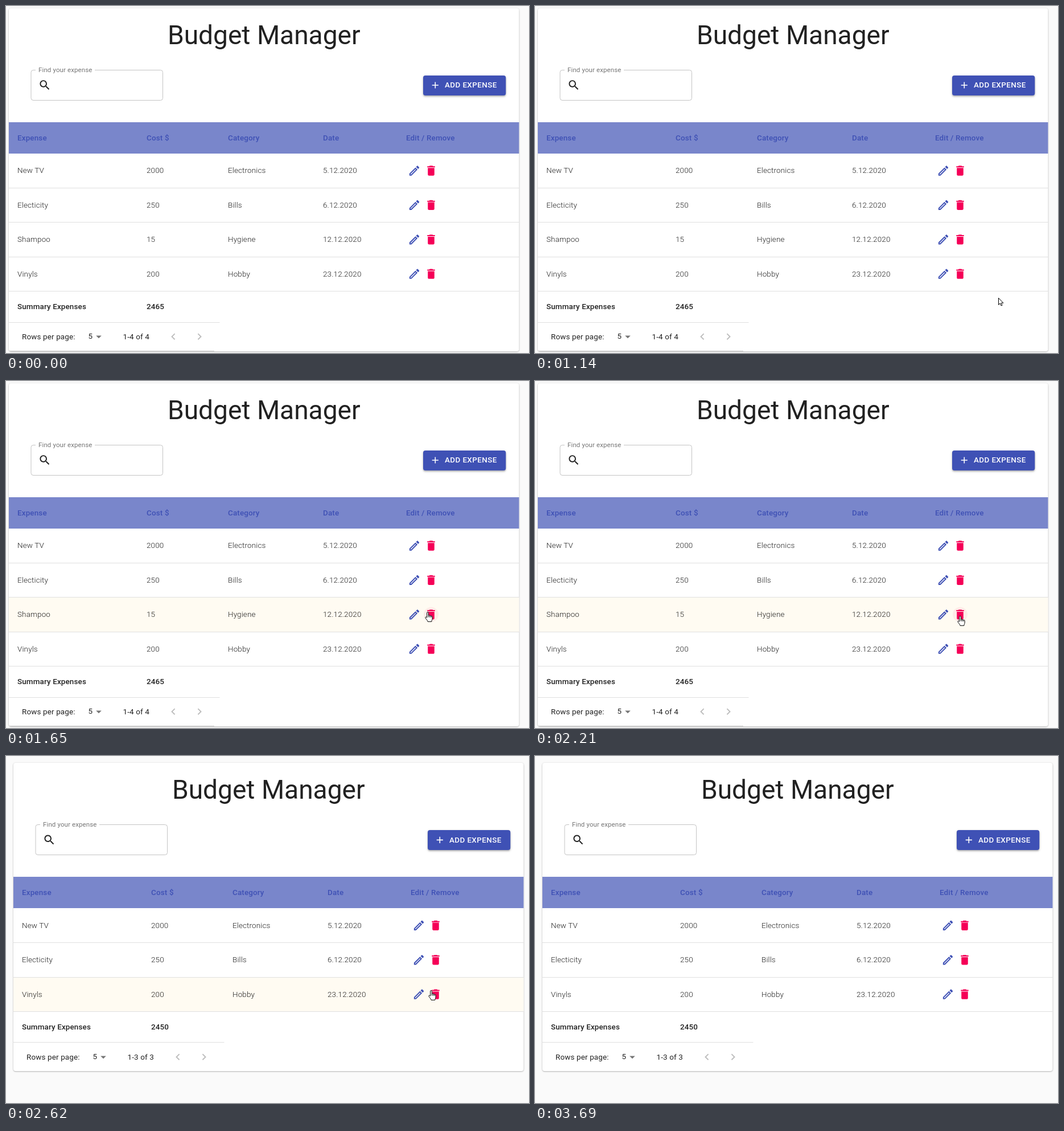
Recreate the animation shown at these times as an HTML page. Size 919x609 px, loop 4070 ms.

```html
<!DOCTYPE html>
<html lang="en">
<head>
<meta charset="utf-8">
<title>Budget Manager</title>
<style>
  html, body { margin: 0; width: 100%; height: 100%; overflow: hidden; background: #fafafa; }
  svg { display: block; }
  text { font: 400 13.44px Roboto, Arial, sans-serif; letter-spacing: .01071em; fill: rgba(0,0,0,.87); white-space: pre; }
  .title { font-size: 46.08px; letter-spacing: 0; text-anchor: middle; }
  .label { font-size: 11.52px; letter-spacing: .00938em; fill: rgba(0,0,0,.54); }
  .button { font-weight: 500; letter-spacing: .02857em; fill: #fff; }
  .head { font-weight: 500; fill: #3f51b5; }
  .cell { font-weight: 300; }
  .strong { font-weight: 500; }
  .card { filter: drop-shadow(0 1px 1px rgba(0,0,0,.24)) drop-shadow(0 0 1px rgba(0,0,0,.1)); }
  .raised { filter: drop-shadow(0 2px 1px rgba(0,0,0,.2)) drop-shadow(0 1px 2px rgba(0,0,0,.16)); }
</style>
</head>
<body>
<svg id="stage" width="919" height="609" viewBox="0 0 919 609"></svg>
<script>
const LOOP = 4070, REMOVED_AT = 2620;
const SCALE = 0.96, ROW = 60.4, BAND = 54.4, ROWS_TOP = 258.5;
const COLUMNS = [20, 247, 390, 557, 703];
const EXPENSES = [
  ['New TV', 2000, 'Electronics', '5.12.2020'],
  ['Electicity', 250, 'Bills', '6.12.2020'],
  ['Shampoo', 15, 'Hygiene', '12.12.2020'],
  ['Vinyls', 200, 'Hobby', '23.12.2020']
];
const ICONS = {
  edit: 'M14.06 9.02l.92.92L5.92 19H5v-.92l9.06-9.06M17.66 3c-.25 0-.51.1-.7.29l-1.83 1.83 3.75 3.75 1.83-1.83c.39-.39.39-1.02 0-1.41l-2.34-2.34c-.2-.2-.45-.29-.71-.29zm-3.6 3.19L3 17.25V21h3.75L17.81 9.94l-3.75-3.75z',
  trash: 'M6 19c0 1.1.9 2 2 2h8c1.1 0 2-.9 2-2V7H6v12zM19 4h-3.5l-1-1h-5l-1 1H5v2h14V4z',
  add: 'M19 13h-6v6h-2v-6H5v-2h6V5h2v6h6v2z',
  search: 'M15.5 14h-.79l-.28-.27C15.41 12.59 16 11.11 16 9.5 16 5.91 13.09 3 9.5 3S3 5.91 3 9.5 5.91 16 9.5 16c1.61 0 3.09-.59 4.23-1.57l.27.28v.79l5 4.99L20.49 19l-4.99-5zm-6 0C7.01 14 5 11.99 5 9.5S7.01 5 9.5 5 14 7.01 14 9.5 11.99 14 9.5 14z',
  left: 'M15.41 7.41L14 6l-6 6 6 6 1.41-1.41L10.83 12z',
  right: 'M8.59 16.59L13.17 12 8.59 7.41 10 6l6 6-6 6-1.41-1.41z',
  down: 'M7 10l5 5 5-5z'
};
const stage = document.getElementById('stage');

function add(parent, tag, attrs, content) {
  const el = document.createElementNS('http://www.w3.org/2000/svg', tag);
  for (const key in attrs) el.setAttribute(key, attrs[key]);
  if (content !== undefined) el.textContent = content;
  return parent.appendChild(el);
}
const show = (el, visible) => el.setAttribute('display', visible ? 'inline' : 'none');

function buildPage(dx, dy, expenses) {
  const root = add(stage, 'g');
  const snap = y => Math.round(y + dy);
  const rect = (x, y, width, bottom, fill, extra) => add(root, 'rect',
    { x: x + dx, y: snap(y), width, height: snap(bottom) - snap(y), fill, ...extra });
  const text = (x, y, content, cls) => add(root, 'text', { x: x + dx, y: snap(y), class: cls }, content);
  const line = (y, width) => add(root, 'rect', { x: 5 + dx, y: snap(y), width, height: 1, fill: '#e0e0e0' });
  const icon = (name, cx, cy, fill, scale = SCALE) => add(root, 'path', {
    d: ICONS[name], fill, transform: `translate(${cx + dx} ${cy + dy}) scale(${scale}) translate(-12 -12)`
  });

  const rowsEnd = ROWS_TOP + ROW * expenses.length;
  const summaryEnd = rowsEnd + BAND;
  rect(5, 4, 896.5, summaryEnd + 51, '#fff', { rx: 4, class: 'card' });
  const hover = add(root, 'rect', { x: 5 + dx, width: 896.5, fill: '#fffbf2' });
  const halo = add(root, 'circle', { cx: 747 + dx, r: 13, fill: '#f50057', 'fill-opacity': .06 });

  text(453.3, 66.8, 'Budget Manager', 'title');

  // Outlined field whose top edge leaves a gap for the label
  const top = snap(112) + .5, bottom = snap(165) + .5;
  add(root, 'path', {
    d: `M${52 + dx} ${top}H${48 + dx}q-4 0-4 4V${bottom - 4}q0 4 4 4H${271.5 + dx}q4 0 4-4V${top + 4}q0-4-4-4H${156 + dx}`,
    fill: 'none', stroke: '#c4c4c4'
  });
  text(57, 115.7, 'Find your expense', 'label');
  icon('search', 68.1, 138.8, 'rgba(0,0,0,.87)');

  rect(733, 122, 145.3, 156.5, '#3f51b5', { rx: 4, class: 'raised' });
  icon('add', 754.3, 139, '#fff', .8);
  text(771, 143.4, 'ADD EXPENSE', 'button');

  rect(5, 204, 896.5, ROWS_TOP, '#7986cb');
  ['Expense', 'Cost $', 'Category', 'Date', 'Edit / Remove']
    .forEach((name, i) => text(COLUMNS[i], 235.7, name, 'head'));

  expenses.forEach((expense, i) => {
    const y = ROWS_TOP + ROW * i;
    expense.forEach((value, c) => text(COLUMNS[c], y + 34.9, value, 'cell'));
    icon('edit', 717.5, y + 30.5, '#3f51b5');
    icon('trash', 747, y + 30.5, '#f50057');
    line(y + ROW, 896.5);
  });

  text(COLUMNS[0], rowsEnd + 31.9, 'Summary Expenses', 'strong');
  text(COLUMNS[1], rowsEnd + 31.9, expenses.reduce((sum, e) => sum + e[1], 0), 'strong');
  line(summaryEnd, 370.5);

  const mid = summaryEnd + 25.7;
  const count = expenses.length;
  text(28, mid + 4.7, 'Rows per page:');
  text(144.5, mid + 3.7, '5');
  icon('down', 163, mid + .2, 'rgba(0,0,0,.54)');
  text(205.5, mid + 4.7, `1-${count} of ${count}`);
  icon('left', 294, mid, 'rgba(0,0,0,.26)');
  icon('right', 340, mid, 'rgba(0,0,0,.26)');
  add(root, 'rect', { x: 7 + dx, y: snap(summaryEnd + 50.4), width: 359, height: 1, fill: '#c8c8c8' });

  function update(pointer, overTrash) {
    const row = pointer ? Math.floor((pointer[1] - dy - ROWS_TOP) / ROW) : -1;
    const inside = row >= 0 && row < count;
    show(hover, inside);
    show(halo, inside && overTrash);
    if (!inside) return;
    const y = ROWS_TOP + ROW * row;
    const first = snap(y) + (row ? 1 : 0);
    hover.setAttribute('y', first);
    hover.setAttribute('height', snap(y + ROW) - first);
    halo.setAttribute('cy', y + 30.5 + dy);
  }
  return { root, update };
}

const before = buildPage(0, 0, EXPENSES);
const after = buildPage(8, 8.4, EXPENSES.filter(e => e[0] !== 'Shampoo'));

const ink = { fill: '#fff', stroke: '#000', 'stroke-width': 1, 'stroke-linejoin': 'round' };
const arrow = add(stage, 'path', { ...ink, d: 'M.5.5V12.4L3.2 9.8 5.1 14 7 13.2 5.2 9.2H8.9Z' });
const hand = add(stage, 'path', {
  ...ink,
  d: 'M3.4 10.2V1.8C3.4 0 6 0 6 1.8V6.6C6.4 5.6 8.2 5.7 8.4 7 9 6.3 10.6 6.6 10.7 7.7 11.5 7.2 12.8 7.7 12.8 8.9V12C12.8 14 11.6 15 11.5 17.3H4.8C4.6 15 1 12 .6 10.6.2 9 2 8.6 3.4 10.2ZM6 6.6V9.6M8.4 7V9.8M10.7 7.7V10'
});

const linear = u => u;
const easeOut = u => u * (1.5 - u / 2);
// Pointer moves in discrete steps along quadratic curves
const MOVES = [
  { start: 500, end: 780, steps: 7, path: [[835, 600], [818, 555], [813, 521]], ease: easeOut },
  { start: 1140, end: 1650, steps: 12, path: [[814, 512], [780, 440], [741, 405]], ease: easeOut },
  { start: 1750, end: 1850, steps: 3, path: [[742, 407], [745, 411], [747, 413]], ease: linear },
  { start: 2210, end: 2260, steps: 2, path: [[747, 412], [747, 411], [747, 411]], ease: linear },
  { start: 3180, end: 3690, steps: 12, path: [[747, 411], [730, 450], [915, 620]], ease: linear, lead: .25 }
];

function pointerAt(t) {
  const move = MOVES.filter(m => t >= m.start).pop();
  if (!move) return null;
  const last = move.steps - 1;
  const progress = (t - move.start) / (move.end - move.start) * last;
  const u = move.ease(Math.min(last, Math.floor(progress + (move.lead || 0) + 1e-6)) / last);
  const [a, b, c] = move.path;
  return a.map((v, i) => (1 - u) ** 2 * v + 2 * u * (1 - u) * b[i] + u * u * c[i]);
}

function render(t) {
  const pointer = t < 3685 ? pointerAt(t) : null;
  const removed = t >= REMOVED_AT;
  const onTrash = t >= 1600 && t < 3350;
  const page = removed ? after : before;
  show(before.root, !removed);
  show(after.root, removed);
  page.update(pointer, onTrash && !(removed && t < 2670));
  show(arrow, pointer && !onTrash);
  show(hand, pointer && onTrash);
  if (!pointer) return;
  const [x, y] = pointer.map(Math.round);
  arrow.setAttribute('transform', `translate(${x} ${y})`);
  hand.setAttribute('transform', `translate(${x - 4.7} ${y})`);
}

const began = performance.now();
function tick() {
  render((performance.now() - began) % LOOP);
  requestAnimationFrame(tick);
}
tick();
</script>
</body>
</html>
```
